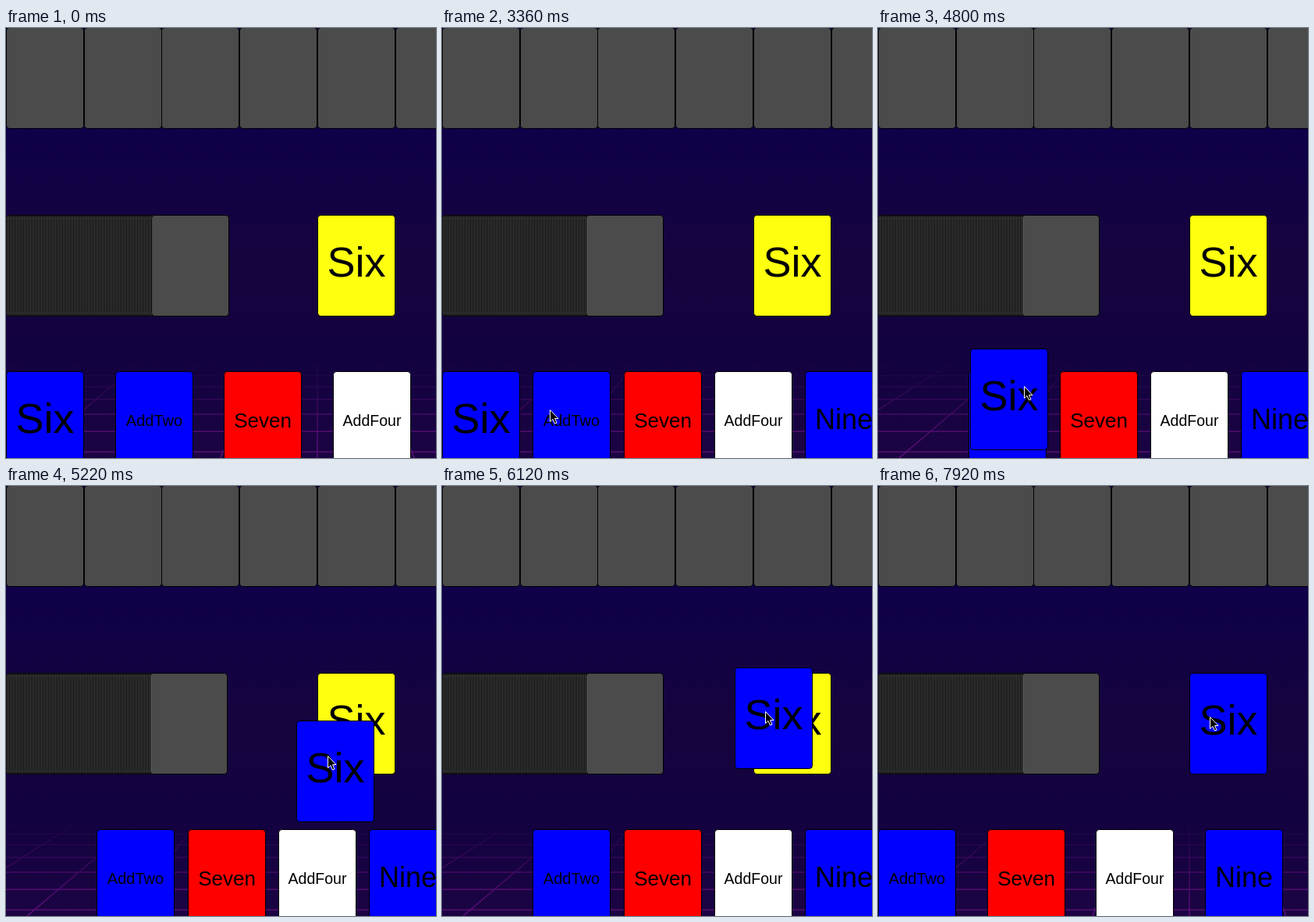
An HTML page with a canvas for the animation above (7980 ms loop, 551 by 550 pixels).

```html
<!DOCTYPE html>
<html lang="en">
<head>
<meta charset="utf-8">
<title>Card game</title>
<style>
html, body { margin: 0; width: 551px; height: 550px; overflow: hidden; background: #12023f; }
canvas { display: block; }
</style>
</head>
<body>
<canvas id="stage" width="551" height="550"></canvas>
<script>
const ctx = document.getElementById('stage').getContext('2d');
const W = 551, H = 550, LOOP = 7980;
const DRAW = 1560, GRAB = 4500, DROP = 7800;
const GREY = '#4b4b4b', BLUE = '#0000ff', RED = '#ff0000', WHITE = '#ffffff', YELLOW = '#ffff10';
const SIX = ['Six', BLUE, 54];
const HAND = [['AddTwo', BLUE, 20], ['Seven', RED, 26], ['AddFour', WHITE, 19.5]];
const NINE = ['Nine', BLUE, 36];

// Cursor keys: [time, value], eased between neighbours
const cursorX = [[60, 562], [780, 257], [3000, 257], [3360, 138], [3900, 40], [GRAB, 40],
  [5200, 412], [5600, 414], [7100, 414], [7400, 425]];
const cursorY = [[60, 395], [780, 313], [3000, 313], [3360, 488], [3900, 496], [GRAB, 496],
  [5600, 288], [7100, 288], [7400, 295]];

function valueAt(keys, t) {
  if (t <= keys[0][0]) return keys[0][1];
  for (let i = 1; i < keys.length; i++) {
    const [t0, a] = keys[i - 1], [t1, b] = keys[i];
    if (t < t1) {
      const u = (t - t0) / (t1 - t0);
      return a + (b - a) * u * u * (3 - 2 * u);
    }
  }
  return keys[keys.length - 1][1];
}

function background() {
  const sky = ctx.createLinearGradient(0, 128, 0, H);
  sky.addColorStop(0, '#0f0049');
  sky.addColorStop(0.4, '#16043e');
  sky.addColorStop(0.7, '#12023f');
  sky.addColorStop(1, '#1c0443');
  ctx.fillStyle = sky;
  ctx.fillRect(0, 0, W, H);

  // Perspective floor grid, fading out towards the horizon
  const vx = 399, vy = 235;
  const glow = ctx.createLinearGradient(0, 425, 0, H);
  glow.addColorStop(0, 'rgba(130,20,150,0)');
  glow.addColorStop(1, 'rgba(130,20,150,0.75)');
  ctx.strokeStyle = glow;
  ctx.lineWidth = 1.3;
  ctx.beginPath();
  for (let i = -12; i <= 6; i++) {
    const dx = i * 124, k = 190 / 315;
    ctx.moveTo(vx + dx * k, vy + 190);
    ctx.lineTo(vx + dx, H);
  }
  for (let i = 0; i < 7; i++) {
    const y = vy + 1 / (0.003257 + i * 0.000302);
    ctx.moveTo(0, y);
    ctx.lineTo(W, y);
  }
  ctx.stroke();
}

function card(x, y, fill, label, size) {
  x = Math.round(x);
  y = Math.round(y);
  ctx.beginPath();
  ctx.roundRect(x + 0.5, y + 0.5, 99, 129, 4);
  ctx.fillStyle = fill;
  ctx.fill();
  ctx.strokeStyle = '#000';
  ctx.lineWidth = 1;
  ctx.stroke();
  if (!label) return;
  ctx.font = size + 'px "Liberation Sans", Arial, sans-serif';
  ctx.textAlign = 'center';
  ctx.fillStyle = '#000';
  ctx.fillText(label, x + 50, y + 64.7 + size * 0.265);
}

const face = (x, y, [label, fill, size]) => card(x, y, fill, label, size);

function cursor(x, y) {
  const points = [[0, 0], [0, 15], [3.5, 12], [6, 17.5], [8.5, 16.5], [6, 11], [10.5, 11]];
  ctx.beginPath();
  for (const [px, py] of points) ctx.lineTo(Math.round(x) + 0.5 + px, Math.round(y) + 0.5 + py);
  ctx.closePath();
  ctx.fillStyle = '#000';
  ctx.fill();
  ctx.strokeStyle = '#fff';
  ctx.lineWidth = 1;
  ctx.stroke();
}

function render(t) {
  const drawn = t >= DRAW, held = t >= GRAB && t < DROP, dropped = t >= DROP;
  background();

  for (let i = 0; i < 6; i++) card(i * 698 / 7, -1, GREY);
  const pile = drawn ? 93 : 94;
  for (let i = 0; i < pile; i++) card(i * 2, 239, GREY);

  if (dropped) face(399, 239, SIX);
  else card(399, 239, YELLOW, 'Six', 54);

  const hand = [...(dropped ? [] : [SIX]), ...HAND, ...(drawn ? [NINE] : [])];
  const gap = 698 / (hand.length + 1);
  hand.forEach((c, i) => { if (!(held && c === SIX)) face(i * gap, 439, c); });

  // The held card trails the pointer slightly
  if (held) face(valueAt(cursorX, t - 40) - 39, valueAt(cursorY, t - 40) - 56, SIX);
  cursor(valueAt(cursorX, t), valueAt(cursorY, t));
}

function tick() {
  render(performance.now() % LOOP);
  requestAnimationFrame(tick);
}
tick();
</script>
</body>
</html>
```
